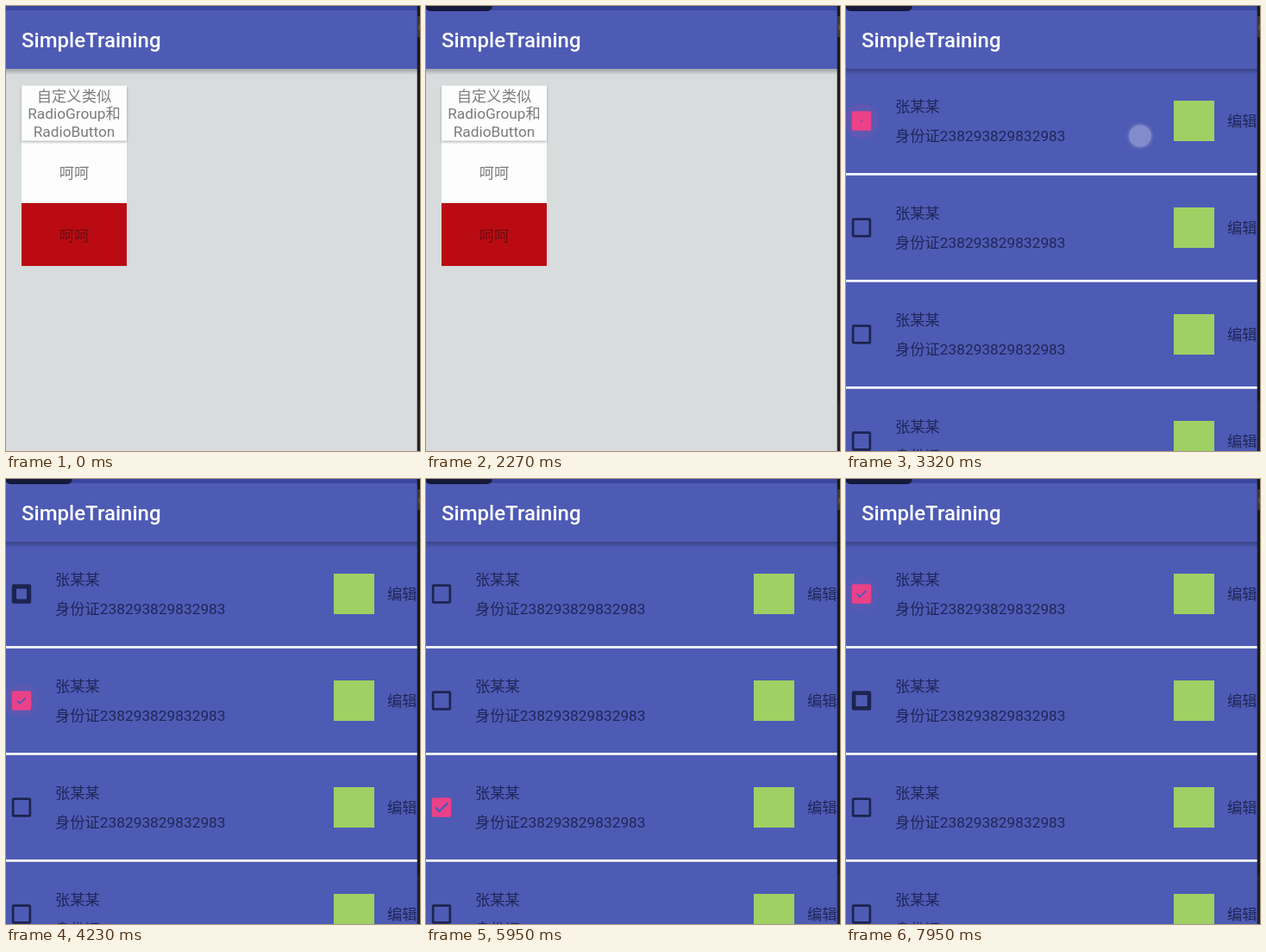
These frames come from a looping animation (480x517 px, 8 s). An HTML page:

```html
<!DOCTYPE html>
<html lang="zh">
<head>
<meta charset="utf-8">
<style>
  html, body { margin: 0; width: 100%; height: 100%; overflow: hidden; background: #e9e7f4; }
  svg { display: block; width: 100%; height: 100%; }
  text { font: 17.3px Roboto, "Noto Sans CJK SC", "Noto Sans CJK", sans-serif; }
  .title { font-size: 24px; font-weight: 500; fill: #fff; }
  .menu text { text-anchor: middle; fill: #7b7c7d; }
  .list text { fill: #1f2759; }
</style>
</head>
<body>
<svg viewBox="0 0 480 517" preserveAspectRatio="none">
  <defs>
    <linearGradient id="shade" x2="0" y2="1">
      <stop stop-color="#000" stop-opacity=".26"/>
      <stop offset="1" stop-color="#000" stop-opacity="0"/>
    </linearGradient>
    <radialGradient id="glow">
      <stop offset=".7" stop-color="#fff" stop-opacity=".35"/>
      <stop offset="1" stop-color="#fff" stop-opacity="0"/>
    </radialGradient>
    <filter id="lift" x="-10%" y="-10%" width="120%" height="130%">
      <feDropShadow dx="0" dy="1.5" stdDeviation="1.6" flood-opacity=".3"/>
    </filter>
  </defs>

  <rect width="480" height="517" fill="#e9e7f4"/>
  <g id="menu" class="menu">
    <rect y="72" width="480" height="445" fill="#d8dcdc"/>
    <rect x="18" y="157" width="122" height="72" fill="#fdfdfe"/>
    <rect x="18" y="92.5" width="122" height="64" fill="#fdfdfe" filter="url(#lift)"/>
    <rect x="18" y="229" width="122" height="73" fill="#ba0b13"/>
    <text x="79" y="111">自定义类似</text>
    <text x="79" y="131.3">RadioGroup和</text>
    <text x="79" y="151.6">RadioButton</text>
    <text x="79" y="200">呵呵</text>
    <text x="79" y="272.5" style="fill:#6d0d12">呵呵</text>
  </g>
  <g id="bar">
    <rect width="480" height="73" fill="#4e5bb5"/>
    <rect width="480" height="5" fill="#3b479f"/>
    <rect y="73" width="480" height="7" fill="url(#shade)"/>
  </g>

  <g id="list" class="list">
    <rect width="480" height="517" fill="#4e5bb5"/>
    <g id="rows"></g>
    <rect width="480" height="5" fill="#3b479f"/>
    <rect y="73" width="480" height="7" fill="url(#shade)"/>
  </g>

  <text class="title" x="18" y="48.2">SimpleTraining</text>
  <path id="pill" d="M0 0H77Q76 6 70 6H6Q1 6 0 2Z" fill="#15193a"/>
  <g id="touch">
    <circle r="17" fill="url(#glow)"/>
    <circle r="13" fill="#d9dcf2" stroke="#b9bcd0" stroke-width="1"/>
  </g>
  <g>
    <rect x="476.7" width="4" height="517" fill="#191b20"/>
    <rect x="477" y="12" width="3" height="24" fill="#3d3b3b"/>
    <rect x="478.5" y="22" width="1.5" height="6" fill="#6e5340"/>
    <rect x="477" y="459" width="3" height="58" fill="#20242e"/>
  </g>
</svg>
<script>
const LOOP = 8000, ROW = 124;
const PINK = '#ea4189', NAVY = '#1c2450';
const $ = id => document.getElementById(id);
const clamp = v => Math.max(0, Math.min(1, v));
const ramp = (t, from, to) => clamp((t - from) / (to - from));

// time of release, row (-1: menu button), finger position
const taps = [
  [1650, -1, 85, 124],
  [3210, 0, 341, 151],
  [4030, 1, 332, 268],
  [4800, 2, 326, 392],
  [6760, 1, 316, 265],
  [7740, 0, 326, 150]
];

$('rows').innerHTML = [0, 1, 2, 3].map(i => `
  <g transform="translate(0 ${i * ROW})">
    <circle class="halo" cx="18" cy="133.5" r="20" fill="${PINK}"/>
    <path class="box" fill-rule="evenodd"/>
    <path class="tick" d="M-7 .2L-2.6 4.6L7 -5" fill="none" stroke="#4e5bb5" stroke-width="2.5"/>
    <text x="57" y="123.4">张某某</text>
    <text x="57" y="156.6">身份证238293829832983</text>
    <rect x="380" y="110" width="47" height="47" fill="#9fd064"/>
    <text x="442" y="139.9">编辑</text>
    <rect y="194" width="480" height="2.8" fill="#f4f5fb"/>
  </g>`).join('');

const rows = [...$('rows').children].map(g => ({
  halo: g.querySelector('.halo'),
  box: g.querySelector('.box'),
  tick: g.querySelector('.tick')
}));

function checkState(row, t) {
  let state = { hole: 1, tick: 0, color: NAVY, halo: 0 };
  taps.forEach(([at, target], k) => {
    if (target < 0 || t < at) return;
    const age = t - at;
    if (target === row) {
      state = {
        hole: 1 - ramp(age, 0, 125),
        tick: ramp(age, 110, 240),
        color: PINK,
        halo: .11 * ramp(age, 0, 60) * (1 - ramp(age, 120, 320))
      };
    } else if (taps[k - 1][1] === row) {
      state = { hole: ramp(age, 110, 240), tick: 1 - ramp(age, 20, 130), color: NAVY, halo: 0 };
    }
  });
  return state;
}

function drawCheck({ halo, box, tick }, s) {
  const h = 8.5 * s.hole;
  box.setAttribute('d', `M9 122.3H27Q29.2 122.3 29.2 124.5V142.5Q29.2 144.7 27 144.7H9Q6.8 144.7 6.8 142.5V124.5Q6.8 122.3 9 122.3Z
    M${18 - h} ${133.5 - h}h${2 * h}v${2 * h}h${-2 * h}Z`);
  box.setAttribute('fill', s.color);
  tick.setAttribute('transform', `translate(18 133.5) scale(${s.tick})`);
  tick.setAttribute('opacity', s.tick > 0 ? 1 : 0);
  halo.setAttribute('opacity', s.halo);
}

function drawTouch(t) {
  const tap = taps.find(([at]) => t > at - 110 && t < at + 200);
  const touch = $('touch');
  touch.setAttribute('opacity', tap ? .75 * ramp(t, tap[0] - 110, tap[0] - 60) * (1 - ramp(t, tap[0] + 20, tap[0] + 200)) : 0);
  if (tap) touch.setAttribute('transform', `translate(${tap[2]} ${tap[3]})`);
}

// The menu slides down and fades out while the list fades in above it.
function drawPages(t) {
  const fade = ramp(t, 2330, 2630);
  $('menu').setAttribute('transform', `translate(0 ${415 * fade})`);
  $('menu').setAttribute('opacity', 1 - fade);
  $('bar').setAttribute('opacity', 1 - ramp(fade, 0, .45));
  $('list').setAttribute('opacity', fade);
  $('pill').setAttribute('opacity', t < 860 ? 0 : 1 - .9 * fade * (1 - fade));
}

function render(t) {
  drawPages(t);
  rows.forEach((row, i) => drawCheck(row, checkState(i, t)));
  drawTouch(t);
}

const start = performance.now();
function tick(now) {
  render(Math.max(0, now - start) % LOOP);
  requestAnimationFrame(tick);
}
render(0);
requestAnimationFrame(tick);
</script>
</body>
</html>
```
